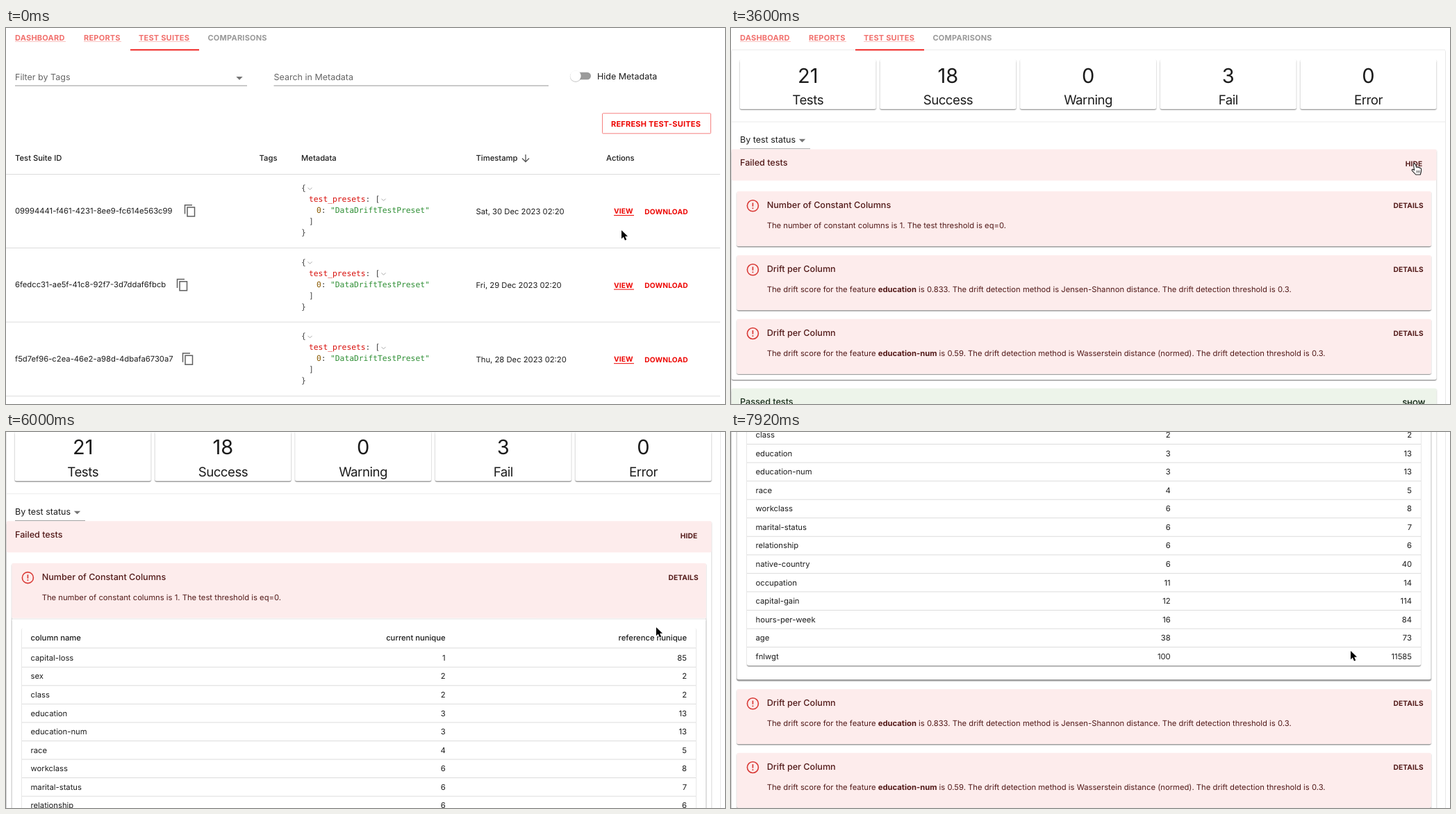
Write an HTML page that moves like this. It is 1035x541 px and loops after 8000 ms.

```html
<!DOCTYPE html>
<html lang="en">
<head>
<meta charset="utf-8">
<title>Test suites</title>
<style>
html, body { margin: 0; width: 100%; height: 100%; overflow: hidden; background: #fff; }
#stage { display: block; width: 100%; height: 100%; }
text { font: 11.25px Inter, sans-serif; fill: #1c1c1c; text-rendering: geometricPrecision; font-optical-sizing: none; white-space: pre; }
.head { font-weight: 500; }
.body1 { font-size: 12.5px; }
.title { font-size: 12.6px; font-weight: 500; }
.tab { font-size: 11px; font-weight: 700; letter-spacing: .02em; }
.btn { font-size: 10.2px; font-weight: 700; letter-spacing: .015em; }
.count { font-size: 29px; }
.label { font-size: 18.7px; letter-spacing: -.5px; }
.mono { font: 11.3px "DejaVu Sans Mono", monospace; }
.bold { font-weight: 700; }
</style>
</head>
<body>
<svg id="stage" viewBox="0 0 1035 541"></svg>
<script>
const LOOP = 8000, STEP = 80;
const RED = '#ed0400', GREY = '#949494';
const FAIL = { bg: '#fdecec', ink: '#521a19', icon: '#d93a36' };
const PASS = { bg: '#edf4ea', ink: '#1b2f1d', icon: '#388e3c' };

const rect = (x, y, w, h, fill, extra = '') =>
  `<rect x="${x}" y="${y}" width="${w}" height="${h}" fill="${fill}" ${extra}/>`;
const path = (d, extra) => `<path d="${d}" ${extra}/>`;
const stroke = (d, color, width = 1) => path(d, `fill="none" stroke="${color}" stroke-width="${width}"`);
const hline = (x1, x2, y, color, width = 1) => stroke(`M${x1} ${y}H${x2}`, color, width);
const move = (x, y, content) => `<g transform="translate(${x} ${y})">${content}</g>`;
const clip = (y, h, content) =>
  `<svg y="${y}" width="1035" height="${Math.max(h, 0)}">${move(0, -y, content)}</svg>`;

// y is the middle of the capitals
const text = (x, y, str, cls = '', fill = '', anchor = 'start') =>
  `<text x="${x}" y="${y}" dy=".364em" class="${cls}" text-anchor="${anchor}"${fill && ` style="fill:${fill}"`}>${str}</text>`;

const paper = (x, y, w, h, fill = '#fff') =>
  rect(x - 1, y + .5, w + 2, h + 1.2, '#000', 'fill-opacity=".09" rx="3"') +
  rect(x, y + 2, w, h - .6, '#000', 'fill-opacity=".31" rx="3"') +
  rect(x, y, w, h, fill, 'rx="2.5"');

// Eased interpolation over [time, ...values] keys
function track(t, keys) {
  let i = keys.findIndex(k => k[0] > t);
  if (i < 0) return keys[keys.length - 1].slice(1);
  if (i === 0) return keys[0].slice(1);
  const a = keys[i - 1], b = keys[i], u = (t - a[0]) / (b[0] - a[0]), e = u * u * (3 - 2 * u);
  return a.slice(1).map((v, n) => v + (b[n + 1] - v) * e);
}
const within = (t, a, b) => t >= a && t < b;

function tabs() {
  const links = [['DASHBOARD', 13, 86], ['REPORTS', 112, 166], ['TEST SUITES', 191, 265]];
  return links.map(([name, x, end]) =>
    text(x, 13.5, name, 'tab', '#f1706d') + hline(x, end, 19.5, '#f9c3c1')).join('') +
    text(290.5, 13.5, 'COMPARISONS', 'tab', '#999') +
    rect(179, 30.6, 99, 1.7, RED);
}

const dropArrow = (x, y) => path(`M${x - 4.7} ${y - 2.2}h9.4l-4.7 4.7z`, 'fill="#757575"');

function suiteRow(id, iconX, date, i, hover) {
  const y = 106.6 * i;
  const chevron = (x, cy) => stroke(`M${x - 3} ${cy - 1.3}l3 3 3-3`, '#aaa');
  return move(0, y,
    text(13, 262.5, id) +
    move(iconX, 262.5, stroke('M-6.5 5V-7.7H4', '#5f5f5f', 1.5) + stroke('M-3-4.4H7.5V8.6H-3Z', '#5f5f5f', 1.5)) +
    text(425, 230, '{', 'mono', '#444') + chevron(437.5, 231) +
    text(436, 246, 'test_presets', 'mono', '#d8100c') + text(517.5, 246, ':', 'mono', '#444') +
    text(531.5, 246, '[', 'mono', '#444') + chevron(543.5, 247) +
    text(447, 262, '0', 'mono', '#8a5a00') + text(453.8, 262, ':', 'mono', '#444') +
    text(467, 262, '"DataDriftTestPreset"', 'mono', '#2f8f35') +
    text(436, 278, ']', 'mono', '#444') + text(425, 294, '}', 'mono', '#444') +
    text(676.5, 263.5, date) +
    (hover ? rect(867, 251, 45, 25, RED, 'fill-opacity=".05" rx="3"') : '') +
    text(875, 263.5, 'VIEW', 'btn', RED) + hline(875, 904, 269.5, RED) +
    text(919.3, 264, 'DOWNLOAD', 'btn', RED) +
    hline(0, 1028, 316.5, '#dcdcdc'));
}

function suitesPage(t) {
  const heads = [[13, 'Test Suite ID'], [364.5, 'Tags'], [425, 'Metadata'], [676.5, 'Timestamp'], [864, 'Actions']];
  const rows = [
    ['09994441-f461-4231-8ee9-fc614e563c99', 264, 'Sat, 30 Dec 2023 02:20'],
    ['6fedcc31-ae5f-41c8-92f7-3d7ddaf6fbcb', 253, 'Fri, 29 Dec 2023 02:20'],
    ['f5d7ef96-c2ea-46e2-a98d-4dbafa6730a7', 261, 'Thu, 28 Dec 2023 02:20']];
  return text(13, 70, 'Filter by Tags', 'body1', '#666') + hline(13, 347, 83, GREY) + dropArrow(336, 72.3) +
    text(385.5, 70, 'Search in Metadata', 'body1', '#666') + hline(385.5, 781, 83, GREY) +
    rect(816, 63.8, 26, 10.4, '#9b9b9b', 'rx="5.2"') +
    '<circle cx="820" cy="69.8" r="8.2" fill="#000" fill-opacity=".2"/><circle cx="820" cy="69" r="7.8" fill="#fff"/>' +
    text(851, 69, 'Hide Metadata', 'body1') +
    rect(858.5, 122.8, 156, 29, '#fff', 'stroke="#f68180" rx="1"') +
    text(871, 137.5, 'REFRESH TEST-SUITES', 'tab', RED) +
    heads.map(([x, name]) => text(x, 187, name, 'head')).join('') +
    stroke('M748 182V192M743 187.5l5 5 5-5', '#555', 1.3) +
    hline(0, 1028, 210.5, '#dcdcdc') +
    rows.map((r, i) => suiteRow(...r, i, i === 0 && within(t, 240, 560))).join('');
}

function statusIcon(x, y, kind) {
  const mark = kind === FAIL
    ? '<circle r="8" fill="none" stroke-width="1.6"/>' + path('M0-4.4V1M0 2.7V4.4', 'stroke-width="1.7"')
    : path('M7.9 0A7.9 7.9 0 1 1 2.6-7.4M-4.1-1.1L-.9 2.2 7.4-5.8', 'fill="none" stroke-width="1.6"');
  return `<g transform="translate(${x} ${y})" stroke="${kind.icon}">${mark}</g>`;
}

function testCard(x, y, w, kind, title, body, { details = true, extra = 0, content = '', under = '' } = {}) {
  return paper(x, y, w, 79 + extra) + rect(x, y, w, 79, kind.bg, 'rx="2.5"') + under +
    statusIcon(x + 23, y + 20.8, kind) +
    text(x + 43.3, y + 19.3, title, 'title', kind.ink) +
    text(x + 43.3, y + 49, body, '', kind.ink) +
    (details ? text(x + w - 11, y + 20.5, 'DETAILS', 'btn', kind.ink, 'end') : '') +
    clip(y + 79, extra, content);
}

function counters() {
  const items = [[21, 'Tests'], [18, 'Success'], [0, 'Warning'], [3, 'Fail'], [0, 'Error']];
  return items.map(([n, label], i) => {
    const x = 12.7 + 201.7 * i;
    return paper(x, 45, 196, 71.7) +
      text(x + 98, 68, n, 'count', '', 'middle') + text(x + 98, 103.5, label, 'label', '', 'middle');
  }).join('') + hline(1, 1028, 135, '#ebebeb');
}

function select(label, focused) {
  return (focused ? rect(13, 149, 101.5, 24.5, '#f2f2f2', 'rx="3"') : '') +
    text(13, 160.5, label, 'body1') + dropArrow(102.5, 162) +
    hline(13, 114, focused ? 173.4 : 173.8, focused ? RED : GREY, focused ? 1.7 : 1);
}

function menu(t) {
  const [alpha] = track(t, [[1520, 0], [1760, 1], [2080, 1], [2320, 0]]);
  if (!alpha) return '';
  return `<g opacity="${alpha}">` + paper(1, 139, 124, 71) +
    rect(1, 146, 124, 29, RED, 'fill-opacity=".08"') +
    (t >= 1840 ? rect(1, 175, 124, 29, '#f3f3f3') : '') +
    text(13, 160.5, 'All tests', 'body1') + text(13, 189.5, 'By test status', 'body1') + '</g>';
}

function allTests() {
  const cards = [
    [PASS, 'Share of Missing Values', 'The share of missing values is 0.00733. The test threshold is lte=0.05.'],
    [FAIL, 'Number of Constant Columns', 'The number of constant columns is 1. The test threshold is eq=0.'],
    [PASS, 'Number of Empty Rows', 'Number of Empty Rows is 0. The test threshold is eq=0.'],
    [PASS, 'Number of Empty Columns', 'Number of Empty Columns is 0. The test threshold is eq=0.']];
  return cards.map((c, i) => testCard(12.8, 187 + 91.8 * i, 1002.7, ...c, { details: i !== 2 })).join('');
}

function columnTable(top) {
  const data = `capital-loss 1 85,sex 2 2,class 2 2,education 3 13,education-num 3 13,race 4 5,workclass 6 8,
marital-status 6 7,relationship 6 6,native-country 6 40,occupation 11 14,capital-gain 12 114,
hours-per-week 16 84,age 38 73,fnlwgt 100 11585`.split(',').map(row => row.trim().split(' '));
  const cells = (y, [name, current, reference], cls) =>
    text(35.5, y, name, cls) + text(632.7, y, current, cls, '', 'end') + text(980, y, reference, cls, '', 'end');
  return paper(8.5, top + 79, 999, 462) + rect(8, top + 79, 1000, 2, '#000', 'fill-opacity=".06"') +
    paper(23, top + 93, 970, 428) +
    cells(top + 107.5, ['column name', 'current nunique', 'reference nunique'], 'head') +
    hline(23, 993, top + 122, '#dcdcdc') +
    data.map((row, i) => cells(top + 136 + 26.55 * i, row) +
      (i < data.length - 1 ? hline(23, 993, top + 149.4 + 26.55 * i, '#dcdcdc') : '')).join('');
}

function spinner(t, y) {
  const turn = (t - 5360) / 1400 * 2 * Math.PI, half = .4 + Math.max(0, t - 5360) / 350;
  const point = a => `${508 + 14.2 * Math.cos(a)} ${y + 14.2 * Math.sin(a)}`;
  const mid = Math.PI / 2 + turn;
  return stroke(`M${point(mid - half)}A14.2 14.2 0 0 1 ${point(mid + half)}`, RED, 2.8);
}

function driftText(feature, score, method) {
  return `The drift score for the feature <tspan class="bold">${feature}</tspan> is ${score}. ` +
    `The drift detection method is ${method}. The drift detection threshold is 0.3.`;
}

function failedCards(t, extra) {
  const top = 235, loaded = t >= 5600;
  const hover = within(t, 5040, 6000) ? rect(950, 243, 51, 24, FAIL.ink, 'fill-opacity=".14" rx="3"') : '';
  return testCard(8.4, top, 999.4, FAIL, 'Number of Constant Columns',
      'The number of constant columns is 1. The test threshold is eq=0.',
      { extra, under: hover, content: loaded ? columnTable(top) : spinner(t, 331.8) }) +
    testCard(8.4, 327 + extra, 999.4, FAIL, 'Drift per Column', driftText('education', '0.833', 'Jensen-Shannon distance')) +
    testCard(8.4, 418.7 + extra, 999.4, FAIL, 'Drift per Column', driftText('education-num', '0.59', 'Wasserstein distance (normed)'));
}

function group(y, kind, name, action, body = 0, content = '') {
  return paper(.8, y, 1014.8, 45 + body) + rect(.8, y, 1014.8, 45, kind.bg, 'rx="2"') +
    text(13, y + 18.7, name, 'title', kind.ink) +
    text(983, y + 20.6, action, 'btn', kind.ink, 'middle') + clip(y + 45, body, content);
}

function ripple(t) {
  if (!within(t, 5200, 5600)) return '';
  const [r, alpha] = track(t, [[5120, 8, .03], [5360, 42, .03], [5440, 42, .03], [5600, 42, 0]]);
  return `<circle cx="992" cy="259" r="${r}" fill="#a01818" fill-opacity="${alpha}"/>`;
}

function resultPage(t) {
  const byStatus = t >= 2160;
  const [open] = track(t, [[3280, 0], [3600, 1]]);
  const [extra] = track(t, [[5200, 0], [5360, 35], [5520, 35], [5680, 463]]);
  const body = open * 286.5 + extra;
  const list = byStatus
    ? group(174.5, FAIL, 'Failed tests', t >= 3280 ? 'HIDE' : 'SHOW', body, failedCards(t, extra)) +
      group(232 + body, PASS, 'Passed tests', 'SHOW')
    : allTests();
  return paper(1, 31, 1027, byStatus ? 264.7 + body : 2000) + hline(1, 1028, 31.5, '#ebebeb') + counters() +
    select(byStatus ? 'By test status' : 'All tests', within(t, 1600, 3280)) + list + menu(t) + ripple(t);
}

function cursor(t) {
  const [x, y] = track(t, [[0, 886, 291], [80, 886, 291], [320, 889, 265], [560, 889, 265], [800, 420, 212],
    [1120, 420, 212], [1200, 303, 198], [1440, 92, 163], [1680, 90, 163], [1920, 76, 187], [2400, 76, 187],
    [2640, 76, 182], [2800, 76, 182], [3200, 984, 195], [3680, 984, 195], [4080, 884, 285], [4240, 880, 289],
    [4720, 880, 289], [5120, 992, 259], [5840, 992, 259], [6160, 880, 303], [6880, 880, 303], [7200, 884, 307],
    [7520, 884, 307], [7760, 890, 313], [7920, 892, 315]]);
  const hand = [[240, 560], [1440, 2400], [3120, 3760], [5040, 6000]].some(([a, b]) => within(t, a, b));
  const shape = hand
    ? path('M-1.6 1.2Q0-1 1.4 1.2L2.6 5.4Q4 4.2 5 5.6 6.6 4.8 7.4 6.4 9.4 6 9.6 8.2L9.5 11.5 8.3 16H1.8L-3.2 10.6Q-4.6 8.6-2.8 8.2L-.4 9.6Z',
        'fill="#fff" stroke="#222" stroke-width="1.1" stroke-linejoin="round"') +
      stroke('M3.2 10V13.4M5.2 10V13.4M7.1 10V13.4', '#333', .8)
    : path('M0 0V12.2L2.8 9.6 5 14.4 7.2 13.4 5.1 8.8H9Z',
        'fill="#000" stroke="#fff" stroke-width="1.6" stroke-linejoin="round" paint-order="stroke"');
  return move(x, y, shape);
}

function scene(t) {
  const [scroll] = track(t, [[3680, 0], [4080, 2], [4240, 4], [4320, 4], [4560, 2], [4640, 2], [4800, 0], [5840, 0],
    [6320, 178], [6480, 205], [6560, 205], [6880, 385], [7120, 385], [7200, 390], [7520, 390], [7760, 414],
    [7840, 414], [7920, 420]]);
  return rect(0, 0, 1035, 541, '#fff') +
    move(0, -scroll, (t < 560 ? suitesPage(t) : resultPage(t)) + tabs()) + cursor(t);
}

const stage = document.getElementById('stage');
let start, shown = -1;
function frame(now) {
  start ??= now;
  const t = Math.floor((now - start) % LOOP / STEP) * STEP;
  if (t !== shown) stage.innerHTML = scene(shown = t);
  requestAnimationFrame(frame);
}
stage.innerHTML = scene(0);
requestAnimationFrame(frame);
</script>
</body>
</html>
```
